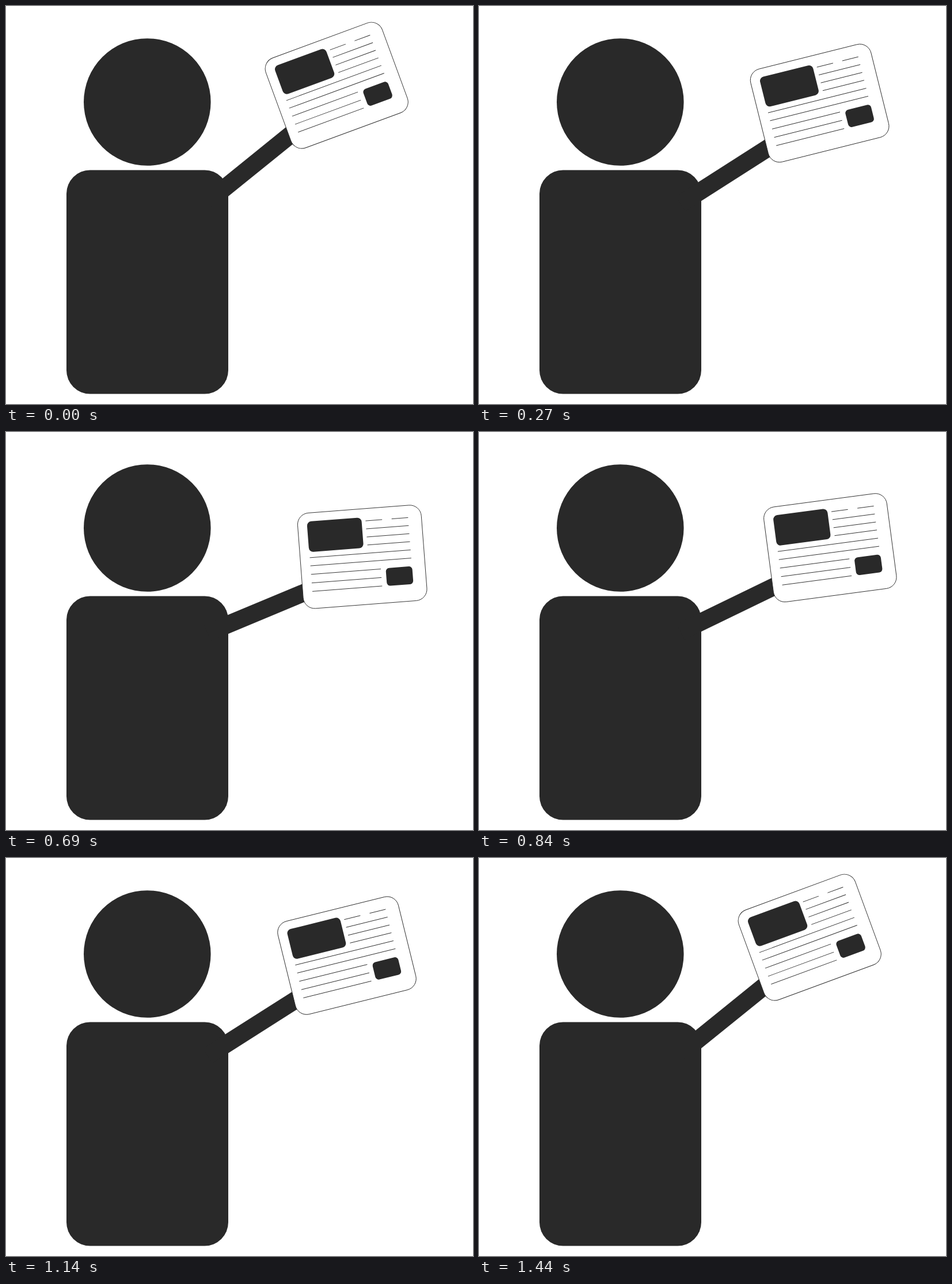
Recreate the animation shown at these times as an HTML page. Size 811 by 690 pixels, loop 1470 ms.

```html
<!DOCTYPE html>
<html lang="en">
<head>
<meta charset="utf-8">
<title>Waving a newspaper</title>
<style>
  html, body { margin: 0; width: 100%; height: 100%; overflow: hidden; background: #fff; }
  svg { display: block; }
</style>
</head>
<body>
<svg width="811" height="690" viewBox="0 0 811 690" fill="#292929">
  <circle cx="245.3" cy="166.5" r="110.3"/>
  <rect x="105" y="284.5" width="281" height="388" rx="41"/>
  <rect id="arm" y="-15.2" width="190" height="30.4"/>
  <g id="paper">
    <rect x="-107.7" y="-83" width="215.4" height="166" rx="20" fill="#fff" stroke="#292929" stroke-width=".9"/>
    <rect x="-91.4" y="-68.2" width="95" height="53" rx="7.5"/>
    <rect x="39" y="22.8" width="46" height="31" rx="6"/>
    <path stroke="#292929" stroke-width=".9" d="M10.4-61.7H39.3M55.9-61.7H84.6
      M10.4-47.8H84.6M10.4-33.7H84.6M10.4-19.8H84.6
      M-91-5.5H84.7M-91 8.7H84.7M-91 23.5H30.6M-91 38.4H30.6M-91 53.1H30.6"/>
  </g>
</svg>
<script>
  const STEP = 30, STEPS = 49, LOWEST = 23;
  const arm = document.getElementById('arm');
  const paper = document.getElementById('paper');

  // Each pose is [x, y, angle], blended linearly from raised to lowered.
  function pose(part, raised, lowered, k) {
    const [x, y, angle] = raised.map((v, i) => v + (lowered[i] - v) * k);
    part.setAttribute('transform', `translate(${x} ${y}) rotate(${angle})`);
  }

  function draw(now) {
    const n = Math.floor(now / STEP) % STEPS;
    const k = n <= LOWEST ? n / LOWEST : (STEPS - 1 - n) / (STEPS - 1 - LOWEST);
    pose(arm, [350, 339.5, -38.9], [350, 348.4, -22.6], k);
    pose(paper, [574.2, 137.6, -20.2], [618.7, 216.4, -4.4], k);
  }

  const start = performance.now();
  function tick() {
    draw(performance.now() - start);
    requestAnimationFrame(tick);
  }
  tick();
</script>
</body>
</html>
```
